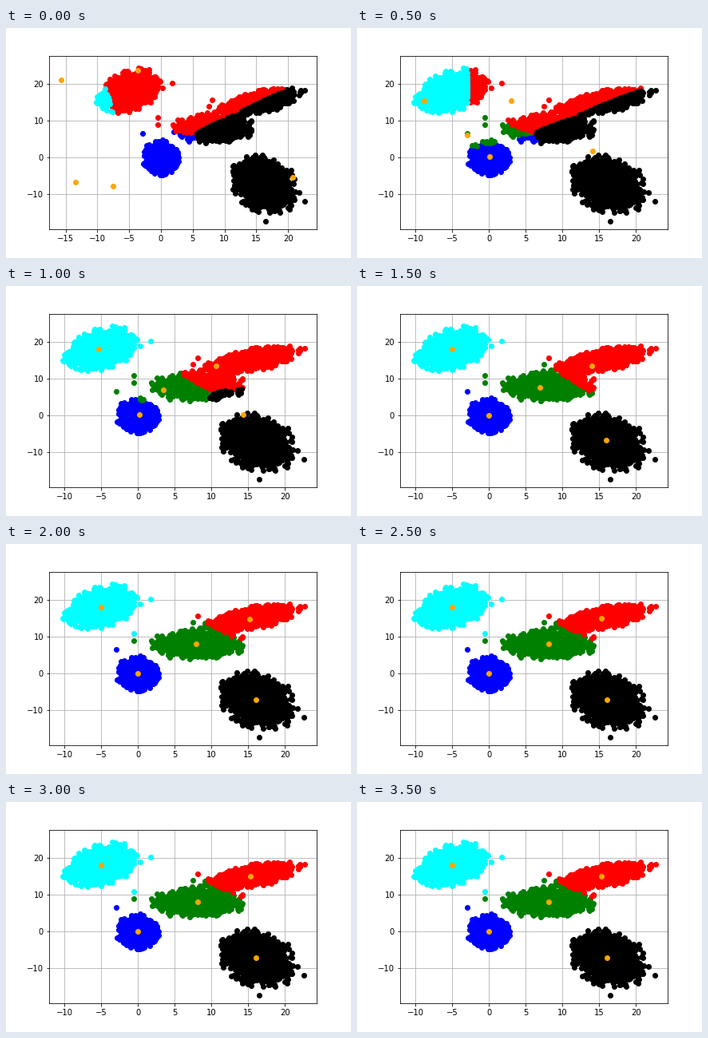
Recreate the animation shown at these times as a matplotlib script. Size 432 by 288 pixels, loop 5000 ms.

```python
import numpy as np
import matplotlib.pyplot as plt
from matplotlib.animation import FuncAnimation

STEP_MS = 500
STEPS = 10
COLORS = ["blue", "green", "red", "cyan", "black"]

# starting centroids in color order; a centroid left without points restarts
START = [(-7.5, -7.7), (-13.5, -6.8), (-3.6, 23.7), (-15.68, 21), (20.7, -5.5)]
RESTART = (-2.9, 6.1)

OUTLIERS = [(-0.55, 10.9), (-0.55, 9), (-2.95, 6.5), (1.7, 20.2), (7.5, 13.9),
            (8.1, 15.7), (22.65, 18.2), (22.6, -12), (16.45, -17.3)]


def blob(rng, mean, std, corr=0.0, count=2000, reach=3.1):
    """Correlated normal cloud, cut off at `reach` standard deviations."""
    z = rng.standard_normal((count, 2))
    x, y = z[np.hypot(*z.T) < reach].T
    y = corr * x + np.sqrt(1 - corr ** 2) * y
    return np.column_stack([x, y]) * std + mean


def assign(centroids):
    dist = np.linalg.norm(points[:, None] - centroids, axis=2)
    return dist.argmin(axis=1)


def kmeans(centroids):
    """Yield the centroids and point labels of each iteration."""
    for _ in range(STEPS):
        labels = assign(centroids)
        yield centroids, labels
        members = [points[labels == k] for k in range(len(COLORS))]
        centroids = np.array([m.mean(axis=0) if len(m) else RESTART
                              for m in members])


rng = np.random.default_rng(5)
points = np.vstack([
    blob(rng, (0, 0), (0.97, 1.6)),
    blob(rng, (-5, 18), (1.75, 2.1), 0.35),
    blob(rng, (8.1, 8), (2.2, 1.4)),
    blob(rng, (15.2, 15), (2.3, 1.35), 0.6),
    blob(rng, (16, -7.1), (1.85, 2.8), -0.25),
    OUTLIERS,
])
history = list(kmeans(np.array(START)))

fig, ax = plt.subplots(figsize=(6, 4), dpi=72)
fig.subplots_adjust(left=0.125, right=0.9, bottom=0.125, top=0.88)
ax.grid(True)
ax.set_ylim(-19.52, 27.64)
groups = [ax.plot([], [], "o", color=c)[0] for c in COLORS]
centers = ax.plot([], [], "o", color="orange")[0]


def update(step):
    centroids, labels = history[step]
    for k, group in enumerate(groups):
        group.set_data(*points[labels == k].T)
    centers.set_data(*centroids.T)
    # the starting centroids lie outside the cloud and widen the view
    ax.set_xlim((-17.59, 24.48) if step == 0 else (-12.06, 24.30))
    return [*groups, centers]


anim = FuncAnimation(fig, update, frames=STEPS, interval=STEP_MS,
                     repeat=True, repeat_delay=0, blit=False)
plt.show()
```
